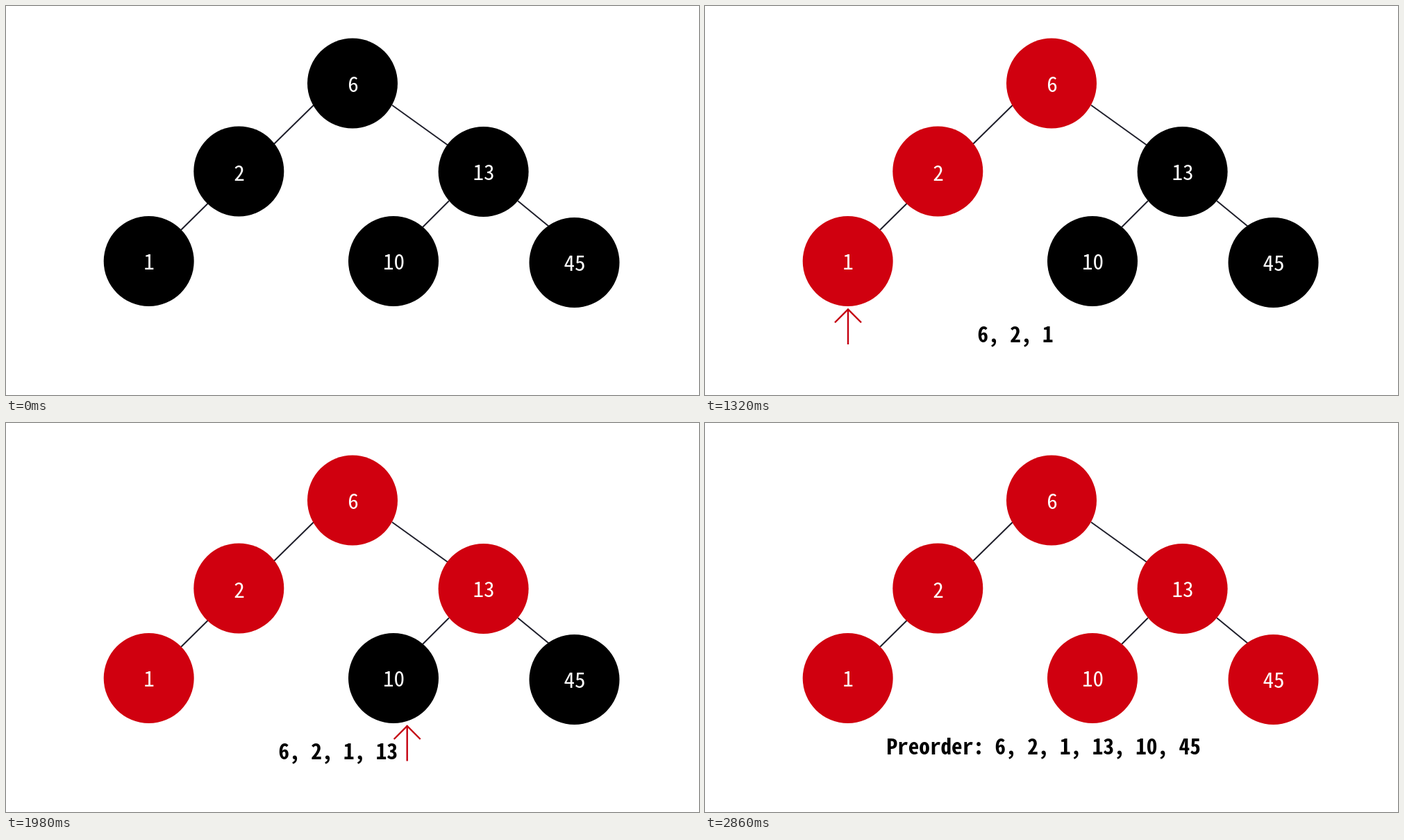
An HTML page with a canvas that plays this animation: 998 px wide and 561 px high, repeating every 3080 ms.

```html
<!DOCTYPE html>
<html lang="en">
<head>
<meta charset="utf-8">
<title>Preorder traversal</title>
<style>
  html, body { margin: 0; width: 100%; height: 100%; overflow: hidden; background: #fff; }
  canvas { display: block; }
</style>
</head>
<body>
<canvas id="stage" width="998" height="561"></canvas>
<script>
const ctx = document.getElementById('stage').getContext('2d');
const STEP = 220, STEPS = 14, RADIUS = 65;
const RED = '#d0000f', ARROW = '#c4000f', EDGE = '#1e1e2a';
const FONT = '31.2px "Noto Sans Mono CJK JP", "Noto Sans Mono", monospace';

// Nodes in visiting order, each with its label position and arrow tip.
const nodes = [
  { value: 6,  x: 499,   y: 111.5, label: [500, 113], tip: [507, 183] },
  { value: 2,  x: 335.3, y: 238.4, label: [336, 241], tip: [336, 311] },
  { value: 1,  x: 205.7, y: 368,   label: [206, 369], tip: [206, 437] },
  { value: 13, x: 687.6, y: 239,   label: [688, 240], tip: [693.3, 311.5] },
  { value: 10, x: 558,   y: 368,   label: [558.5, 369], tip: [577.7, 436.5] },
  { value: 45, x: 818.5, y: 370,   label: [819, 371.5], tip: [822, 438] }
];
const edges = [
  [443, 143, 386, 199], [556, 143, 636, 200.5], [291, 284.5, 252, 323],
  [638, 281, 600, 319], [737, 281, 782, 318]
];

function line(color, width, ...points) {
  ctx.strokeStyle = color;
  ctx.lineWidth = width;
  ctx.beginPath();
  points.forEach(([x, y]) => ctx.lineTo(x, y));
  ctx.stroke();
}

function text(str, x, middle, align, weight, color) {
  ctx.font = weight + ' ' + FONT;
  ctx.textAlign = align;
  ctx.fillStyle = color;
  ctx.fillText(str, x, middle + 10.5);
}

function drawNode(node, visited) {
  ctx.fillStyle = visited ? RED : '#000';
  ctx.beginPath();
  ctx.arc(node.x, node.y, RADIUS, 0, Math.PI * 2);
  ctx.fill();
  text(node.value, ...node.label, 'center', 400, '#fff');
}

function drawArrow([x, y]) {
  line(ARROW, 2.4, [x, y], [x, y + 51]);
  line(ARROW, 2.4, [x - 19, y + 19.5], [x, y + 0.5], [x + 19, y + 19.5]);
}

// Odd steps move the arrow to the next node, even steps visit it.
function draw(step) {
  const visited = Math.min(step >> 1, nodes.length);
  const pointed = Math.ceil(step / 2) - 1;
  const done = step === STEPS - 1;
  const order = nodes.slice(0, visited).map(n => n.value).join(', ');

  ctx.fillStyle = '#fff';
  ctx.fillRect(0, 0, 998, 561);
  edges.forEach(([x1, y1, x2, y2]) => line(EDGE, 2, [x1, y1], [x2, y2]));
  nodes.forEach((node, i) => drawNode(node, i < visited));
  if (done) text('Preorder: ' + order, 261.5, 467.5, 'left', 700, '#000');
  else text(order, 392.5, 474.5, 'left', 700, '#000');
  if (pointed >= 0 && !done) drawArrow(nodes[pointed].tip);
}

function tick() {
  draw(Math.floor(performance.now() / STEP) % STEPS);
  requestAnimationFrame(tick);
}
tick();
</script>
</body>
</html>
```
